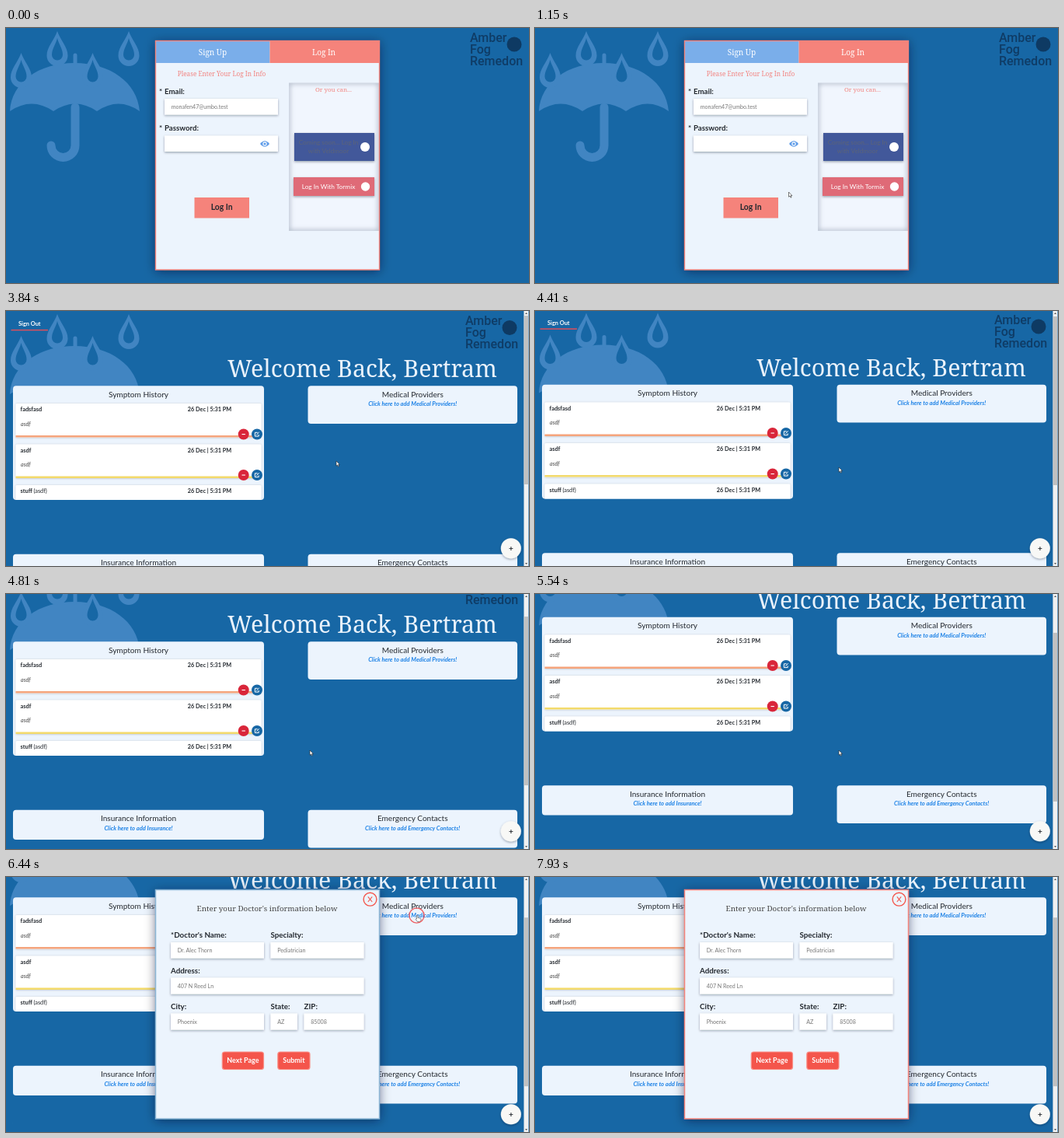
Recreate the animation shown at these times as an HTML page. Size 673 px wide and 328 px high, loop 8000 ms.

```html
<!DOCTYPE html>
<html lang="en">
<head>
<meta charset="utf-8">
<title>Health dashboard walkthrough</title>
<style>
  html, body { margin: 0; width: 100%; height: 100%; overflow: hidden; background: #1767a5; }
  svg { display: block; width: 100vw; height: 100vh; }
  text { font-family: Lato, "Open Sans", sans-serif; fill: #24292f; }
  .serif { font-family: "Noto Serif", serif; font-weight: 300; }
  .logo { font: 500 16px Roboto, sans-serif; fill: #0f3c66; }
  .b { font-weight: 700; }
  .i { font-style: italic; }
  .mid { text-anchor: middle; }
  .white { fill: #fff; }
  .pale { fill: #e9f2fb; }
  .pink { fill: #f2837f; }
  .soft { fill: #444; }
  .hint { fill: #777; }
  .link { fill: #1a80e6; }
  .off { fill: #5c6478; }
</style>
</head>
<body>
<svg id="stage" viewBox="0 0 673 328" xmlns="http://www.w3.org/2000/svg"></svg>
<script>
const LOOP = 8000;
const BG = '#1767a5', SKY = '#4185c2', CARD = '#ecf4fd', CORAL = '#f5837b', RED = '#f4554b';

// ---- drawing helpers ----
const text = (x, y, size, str, cls = '') =>
  `<text x="${x}" y="${y}" font-size="${size}" class="${cls}">${str}</text>`;
const rect = (x, y, w, h, fill, more = '') =>
  `<rect x="${x}" y="${y}" width="${w}" height="${h}" fill="${fill}" ${more}/>`;
const circle = (x, y, r, fill, more = '') =>
  `<circle cx="${x}" cy="${y}" r="${r}" fill="${fill}" ${more}/>`;
const field = (x, y, w, h, hint = '') =>
  rect(x, y, w, h, '#fff', 'filter="url(#low)"') + text(x + 8.7, y + h / 2 + 2.5, 7.1, hint, 'hint');

const drop = (x, y) => `<g transform="translate(${x} ${y})">
  <path d="M0 0C4 12 13.5 20 13.5 31.5A13.5 13.5 0 0 1-13.5 31.5C-13.5 20-4 12 0 0Z" fill="${SKY}"/>
  <path d="M0 9C2 17 7 23 7 30.5A7 7 0 0 1-7 30.5C-7 23-2 17 0 9Z" fill="${BG}"/></g>`;

const umbrella = () => `
  <path d="M5 107C7 70 42 45 88 45S169 70 172 107Q145 88 117 107Q89 88 61 107Q33 88 5 107Z" fill="${SKY}"/>
  <g fill="none" stroke="${SKY}" stroke-linecap="round">
    <path d="M89 46V35" stroke-width="5"/>
    <path d="M89 102V151a15.5 15.5 0 0 1-31 0" stroke-width="11"/>
  </g>` + drop(19.5, 32) + drop(66, 4) + drop(111.5, 32) + drop(158, 4);

const logo = () =>
  text(591, 18, 16, 'Amber', 'logo') + text(591, 33, 16, 'Fog', 'logo') +
  text(591, 48, 16, 'Remedon', 'logo') + circle(648, 21.5, 9.5, '#0e3a63');

// ---- log in screen ----
const eye = () => `<g transform="translate(333 149)">
  <path d="M-6 0Q0-7.5 6 0Q0 7.5-6 0Z" fill="#5d9be8"/>
  ${circle(0, 0, 2.7, '#fff')}${circle(0, 0, 1.6, '#5d9be8')}</g>`;

const login = () =>
  rect(192.5, 16.5, 288, 294.5, CARD, 'filter="url(#deep)"') +
  rect(193, 17, 146.5, 28, '#7aaeea') + rect(339.5, 17, 141, 28, CORAL) +
  text(266, 34.5, 10, 'Sign Up', 'serif mid white') + text(409, 34.5, 10, 'Log In', 'serif mid white') +
  text(277.5, 62, 8.2, 'Please Enter Your Log In Info', 'serif mid pink') +
  text(197, 84.5, 9.7, '*', 'b') + text(204, 84.5, 9.7, 'Email:', 'b') +
  field(204, 91, 146, 20.5, 'monafen47@umbo.test') +
  text(197, 132, 9.7, '*', 'b') + text(204, 132, 9.7, 'Password:', 'b') +
  field(204, 138.5, 146, 20.5) + eye() +
  rect(242.5, 218, 70.5, 26.5, CORAL) + text(277.7, 234.3, 10.4, 'Log In', 'b mid') +
  rect(364, 70.5, 116, 190.5, '#f1f6fe') +
  `<g clip-path="url(#side)"><rect x="363" y="69.5" width="118" height="192.5" fill="none" stroke="#6f7d93" stroke-opacity=".6" stroke-width="4" filter="url(#blur)"/></g>` +
  text(421.5, 82, 7.9, 'Or you can...', 'serif mid pink') +
  rect(371, 135, 103, 36, '#43599a', 'filter="url(#low)"') +
  text(415, 149.5, 8.2, 'Coming soon... Log In', 'mid off') +
  text(415, 161.3, 8.2, 'with Veldmoor', 'mid off') + circle(462, 153, 6, '#fff') +
  rect(370, 192, 104, 24, '#df6b77', 'filter="url(#low)"') +
  text(415, 206.8, 8.3, 'Log In With Tormix', 'mid white') + circle(462.5, 204, 5.7, '#fff') +
  rect(192.5, 16.5, 288, 294.5, 'none', `stroke="${CORAL}" stroke-width="1.4"`);

// ---- dashboard ----
const card = (x, y, w, h, title, link = '') => {
  const cx = x + w / 2;
  return rect(x, y, w, h, CARD, 'rx="4"') +
    text(cx, y + 14.2, 10.1, title, 'mid') + text(cx, y + 25.8, 7.6, link, 'b i mid link');
};

const entry = (y, name, note, colour) =>
  rect(12.5, y, 316, 43.5, '#fff', 'rx="1.5" filter="url(#faint)"') +
  rect(12.5, y + 41, 316, 2.5, colour) +
  text(18.5, y + 10, 7.4, name, 'b') +
  text(233.8, y + 10, 7.3, '26 Dec | 5:31 PM', 'b') +
  text(19, y + 28.8, 7.2, note, 'i soft') +
  circle(305.7, y + 39.5, 7, '#d9263a') + rect(303.5, y + 39, 4.4, 1.1, '#fff') +
  `<g transform="translate(323 ${y + 39.5})">${circle(0, 0, 7, BG)}
    <path d="M.8-2.2H-2.6V2.6H2.2V.4M-.8.9L2.8-2.7" fill="none" stroke="#fff" stroke-width="1"/></g>`;

const dashboard = () =>
  text(16, 19, 7.4, 'Sign Out', 'b white') + rect(6.5, 23.8, 47.5, 1.5, '#de4f5c') +
  text(285, 85.3, 30.4, 'Welcome Back, Bertram', 'serif pale') +
  card(9, 96.3, 323, 146.7, 'Symptom History') +
  '<g clip-path="url(#list)">' +
    entry(119, 'fadsfasd', 'asdf', '#f5a47c') +
    entry(171.5, 'asdf', 'asdf', '#f3da6b') +
    entry(224, 'stuff <tspan font-weight="400">(asdf)</tspan>', '', '#f5a47c') +
  '</g>' +
  `<g id="thumb">${rect(328.5, 97, 3.2, 146, '#e8edf2')}${rect(328.7, 97, 2.6, 116, '#666b70')}</g>` +
  card(388.5, 96.3, 269.5, 48.7, 'Medical Providers', 'Click here to add Medical Providers!') +
  `<g id="hover">${rect(466, 123.3, 115, 0.6, '#1a80e6')}</g>` +
  card(9, 312.8, 323, 38.2, 'Insurance Information', 'Click here to add Insurance!') +
  card(388.5, 312.8, 269.5, 48.7, 'Emergency Contacts', 'Click here to add Emergency Contacts!');

const chrome = () =>
  circle(649.8, 305.3, 13, '#f8f8f6', 'filter="url(#low)"') + text(649.8, 308.6, 10, '+', 'b mid') +
  rect(666.4, 0, 6, 328, '#f1f1f1') + rect(666.6, 6, 5.6, 217, '#c1c1c1', 'id="bar"') +
  '<path d="M668 4l1.5-2 1.5 2ZM668 324l1.5 2 1.5-2Z" fill="#555"/>';

// ---- doctor form ----
const button = (x, w, label) =>
  rect(x, 225, w, 22.5, RED, 'rx="3" stroke="#f98f88" stroke-width="1.2"') +
  text(x + w / 2, 239.4, 9, label, 'b mid white');

const modal = () =>
  rect(192.5, 16.5, 288, 294.5, CARD, 'filter="url(#deep)"') +
  rect(192.5, 16.5, 288, 294.5, 'none', 'id="frame" stroke-width="1.5"') +
  text(336, 43.7, 9.8, "Enter your Doctor's information below", 'serif mid soft') +
  circle(468.5, 28.7, 8.4, 'none', `stroke="${RED}" stroke-width="1.4"`) +
  `<path d="M465.8 25.4l5.4 6.6M471.2 25.4l-5.4 6.6" stroke="${RED}" stroke-width="1.1"/>` +
  [[212, 77.5, "*Doctor's Name:"], [340.5, 77.5, 'Specialty:'], [212, 123.5, 'Address:'],
   [212, 169.5, 'City:'], [340.5, 169.5, 'State:'], [383.5, 169.5, 'ZIP:']]
    .map(([x, y, s]) => text(x, y, 9.8, s, 'b')).join('') +
  field(212, 84, 120, 20.5, 'Dr. Alec Thorn') + field(340.5, 84, 120, 20.5, 'Pediatrician') +
  field(212, 129.5, 248.5, 21, '407 N Reed Ln') +
  field(212, 175.5, 120, 21, 'Phoenix') + field(340.5, 175.5, 34.5, 21, 'AZ') +
  field(383.5, 175.5, 77, 21, '85008') +
  button(278.3, 53.2, 'Next Page') + button(349.8, 41.2, 'Submit');

const pointer = () => `<g id="pointer">
  <path id="arrow" d="M0 0V6.2L1.5 5 2.5 7.2 3.5 6.7 2.6 4.6H4.4Z" fill="#fff" stroke="#222" stroke-width=".6"/>
  <path id="hand" d="M0 0Q1-.8 1.6 0V3L5 3.8Q5.8 4.2 5.5 5.6L4.8 8H1L-1.4 4.8Q-1.2 3.8 0 4.4Z" fill="#fff" stroke="#444" stroke-width=".6"/>
  <path id="beam" d="M-1.3 0H1.3M0 0V6.5M-1.3 6.5H1.3" fill="none" stroke="#555" stroke-width=".6"/>
  <circle id="ring" r="9.6" fill="none" stroke="#ee5f63" stroke-width="1.4"/></g>`;

const shadow = (id, dy, blur, alpha) =>
  `<filter id="${id}" x="-30%" y="-60%" width="160%" height="240%">
    <feDropShadow dx="0" dy="${dy}" stdDeviation="${blur}" flood-color="#04182c" flood-opacity="${alpha}"/></filter>`;

const stage = document.getElementById('stage');
stage.innerHTML = `<defs>
    ${shadow('low', 1.2, 1.5, 0.38)}${shadow('faint', 0.4, 1.3, 0.24)}${shadow('deep', 2, 7, 0.55)}
    <filter id="blur"><feGaussianBlur stdDeviation="3"/></filter>
    <clipPath id="side">${rect(364, 70.5, 116, 190.5, '#000')}</clipPath>
    <clipPath id="list">${rect(9, 96.3, 323, 146.7, '#000', 'rx="4"')}</clipPath>
  </defs>
  ${rect(0, 0, 673, 328, BG)}
  <g id="page">${umbrella()}<g id="logo">${logo()}</g><g id="dash">${dashboard()}</g></g>
  <g id="chrome">${chrome()}</g><g id="login">${login()}</g><g id="modal">${modal()}</g>${pointer()}`;

const $ = {};
stage.querySelectorAll('[id]').forEach(el => { $[el.id] = el; });

const SCROLL = [[0, 0], [4410, 1.5], [4680, 32], [4810, 35], [5540, 66.5], [5670, 70]];
const MOVES = [
  [0], [100, 412, 203, 'hand'], [1150, 326.5, 211, 'arrow'],
  [3450, 338, 210, 'arrow'], [3580, 366, 206, 'arrow'], [3710, 398, 200, 'arrow'],
  [3840, 425, 193, 'arrow'], [3970, 437.5, 188.5, 'arrow'], [4120, 437, 188, 'arrow'],
  [4270, 391, 201, 'arrow'], [5670, 452, 151, 'arrow'], [5820, 482, 112, 'arrow'],
  [5950, 517, 66, 'arrow'], [6080, 528.5, 49.5, 'hand'], [6700, 530, 72, 'arrow'],
  [6820, 532, 118, 'arrow'], [6950, 531.5, 153, 'arrow'], [7090, 435.5, 112, 'arrow'],
  [7230], [7480, 282.5, 76, 'arrow'], [7800, 222, 92, 'beam'], [7930]
];
const at = (list, t) => list.reduce((last, item) => item[0] <= t ? item : last);
const show = (el, on) => el.setAttribute('display', on ? 'inline' : 'none');
const within = (t, a, b) => t >= a && t < b;
const mix = (a, b, k) => `rgb(${a.map((v, i) => Math.round(v + (b[i] - v) * k))})`;

function update(t) {
  const home = t >= 2700;
  const scroll = at(SCROLL, t)[1];
  show($.login, !home);
  show($.dash, home);
  show($.chrome, home);
  show($.modal, t >= 6440);
  $.page.setAttribute('transform', `translate(0 ${-scroll})`);
  $.logo.setAttribute('transform', home ? '' : 'translate(6 -.5)');
  $.bar.setAttribute('y', 6 + scroll * 0.66);
  show($.thumb, within(t, 2700, 3580));
  show($.hover, within(t, 6080, 6440));
  const k = Math.min(1, Math.max(0, (t - 6440) / 510));
  $.frame.setAttribute('stroke', mix([140, 182, 214], [245, 131, 123], k));

  const [, x, y, kind] = at(MOVES, t);
  show($.pointer, kind);
  if (!kind) return;
  $.pointer.setAttribute('transform', `translate(${x} ${y})`);
  for (const id of ['arrow', 'hand', 'beam']) show($[id], id === kind);
  show($.ring, within(t, 550, 1150) || within(t, 6300, 6700));
}

const start = performance.now();
function tick() {
  update((performance.now() - start) % LOOP);
  requestAnimationFrame(tick);
}
update(0);
requestAnimationFrame(tick);
</script>
</body>
</html>
```
